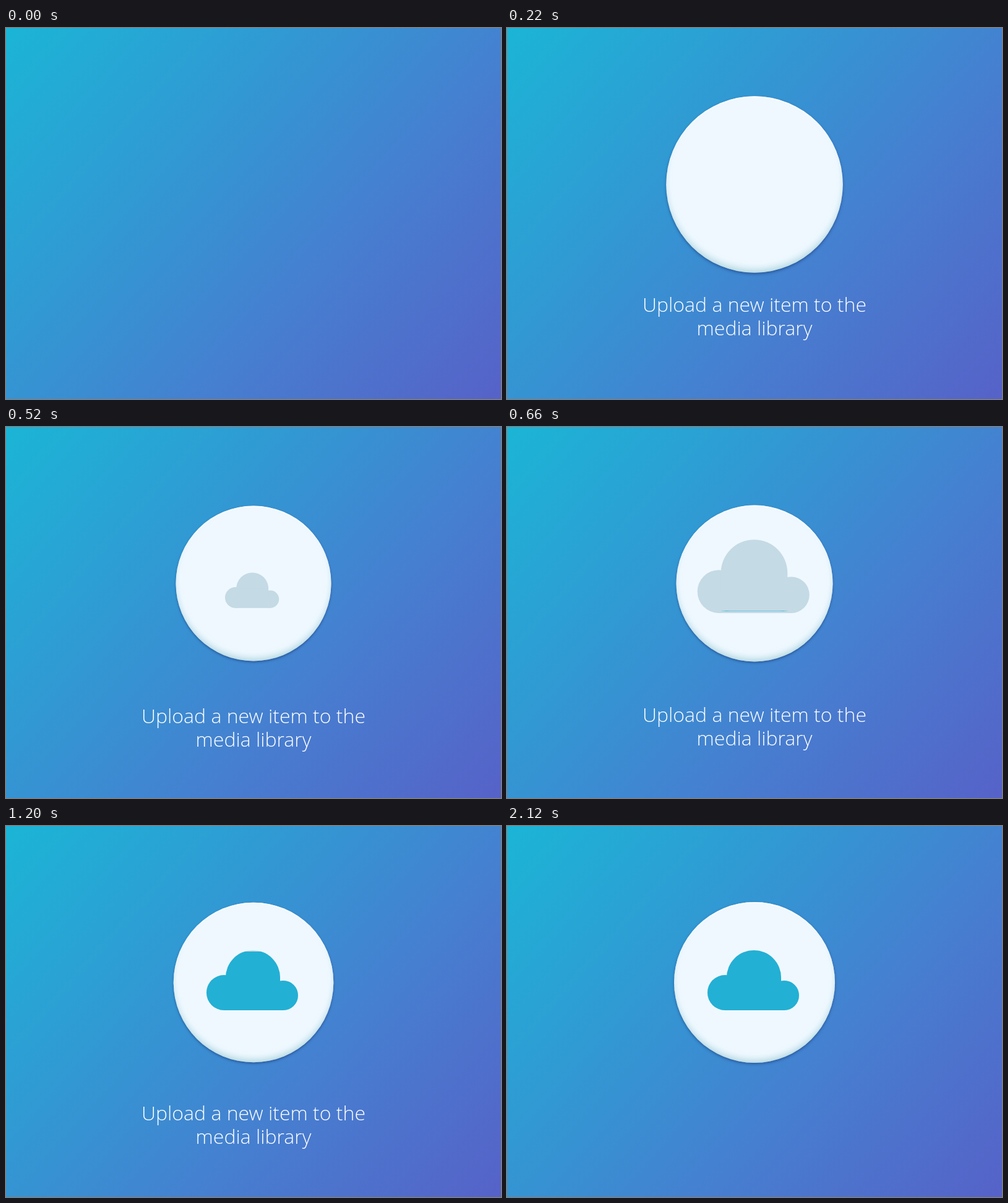
Animation, 800 px wide and 600 px high, one loop 2.22 s. Source, as an HTML page:

```html
<!DOCTYPE html>
<html lang="en">
<head>
<meta charset="utf-8">
<style>
  html, body { margin: 0; width: 100%; height: 100%; overflow: hidden; }
  body { position: relative; background: linear-gradient(132deg, #1bb5d6, #3890d2 45%, #467fd0 64%, #5662c8); }
  #disc {
    position: absolute; left: 270px; top: 123px; width: 260px; height: 260px;
    border-radius: 50%; background: #eff8ff;
    box-shadow: 0 2px 4px rgba(22, 50, 115, .55),
      inset 0 -7px 11px -3px rgba(130, 190, 200, .6),
      inset 0 2px 2px rgba(255, 255, 255, .8);
  }
  svg { position: absolute; left: 0; top: 0; }
  #label {
    position: absolute; left: 0; top: 445px; width: 800px; text-align: center;
    color: #fff; font: 300 32px/38px "Open Sans", Lato, sans-serif;
  }
</style>
</head>
<body>
<div id="disc"></div>
<svg width="800" height="600">
  <defs>
    <g id="shape">
      <circle cx="352.5" cy="269.5" r="28.5"/>
      <circle cx="399" cy="245" r="44"/>
      <circle cx="448" cy="274" r="24"/>
      <path d="M355 245H443V270H448V298H352.5V270H355Z"/>
    </g>
    <clipPath id="level"><rect id="water" x="300" y="298" width="200" height="120"/></clipPath>
  </defs>
  <use id="cloud" href="#shape" fill="#c4dae5"/>
  <g id="fill" clip-path="url(#level)"><use href="#shape" fill="#22b0d4"/></g>
</svg>
<div id="label">Upload a new item to the<br>media library</div>
<script>
const LOOP = 2220, STEP = 20;
const $ = id => document.getElementById(id);
const [disc, cloud, fill, water, label] = ['disc', 'cloud', 'fill', 'water', 'label'].map($);

const linear = u => u;
const outQuad = u => 1 - (1 - u) ** 2;
const outCubic = u => 1 - (1 - u) ** 3;
const smooth = u => u * u * (3 - 2 * u);
const inOutCubic = u => u < .5 ? 4 * u ** 3 : 1 - 4 * (1 - u) ** 3;

// Each key is [time, value, easing towards that value].
const radius = [[0, 0], [140, 148, outQuad], [400, 124.7, smooth], [660, 126.5, linear],
  [880, 128.5, linear], [1200, 129.3, linear], [1620, 130, outQuad]];
const drop = [[10, 170], [200, -18, outQuad], [375, 9, smooth], [880, 0, outCubic]];
const size = [[480, 0], [625, 1.24, outQuad], [840, 1, smooth]];
const surface = [[718, 297.5], [1320, 200, inOutCubic]];
const fade = [[1630, 1], [2110, 0, linear]];

function at(keys, t) {
  if (t <= keys[0][0]) return keys[0][1];
  for (let i = 1; i < keys.length; i++) {
    const [t0, a] = keys[i - 1], [t1, b, ease] = keys[i];
    if (t < t1) return a + (b - a) * ease((t - t0) / (t1 - t0));
  }
  return keys[keys.length - 1][1];
}

function draw(now) {
  const t = Math.floor(now % LOOP / STEP) * STEP;
  disc.style.transform = `scale(${at(radius, t) / 130})`;
  cloud.setAttribute('transform', `translate(397 285) scale(${at(size, t)}) translate(-397 -285)`);
  fill.style.visibility = t < 620 ? 'hidden' : 'visible';
  water.setAttribute('y', at(surface, t));
  label.style.transform = `translateY(${at(drop, t)}px)`;
  label.style.opacity = t < STEP ? 0 : at(fade, t);
}

const start = performance.now();
function tick() {
  draw(performance.now() - start);
  requestAnimationFrame(tick);
}
tick();
</script>
</body>
</html>
```
